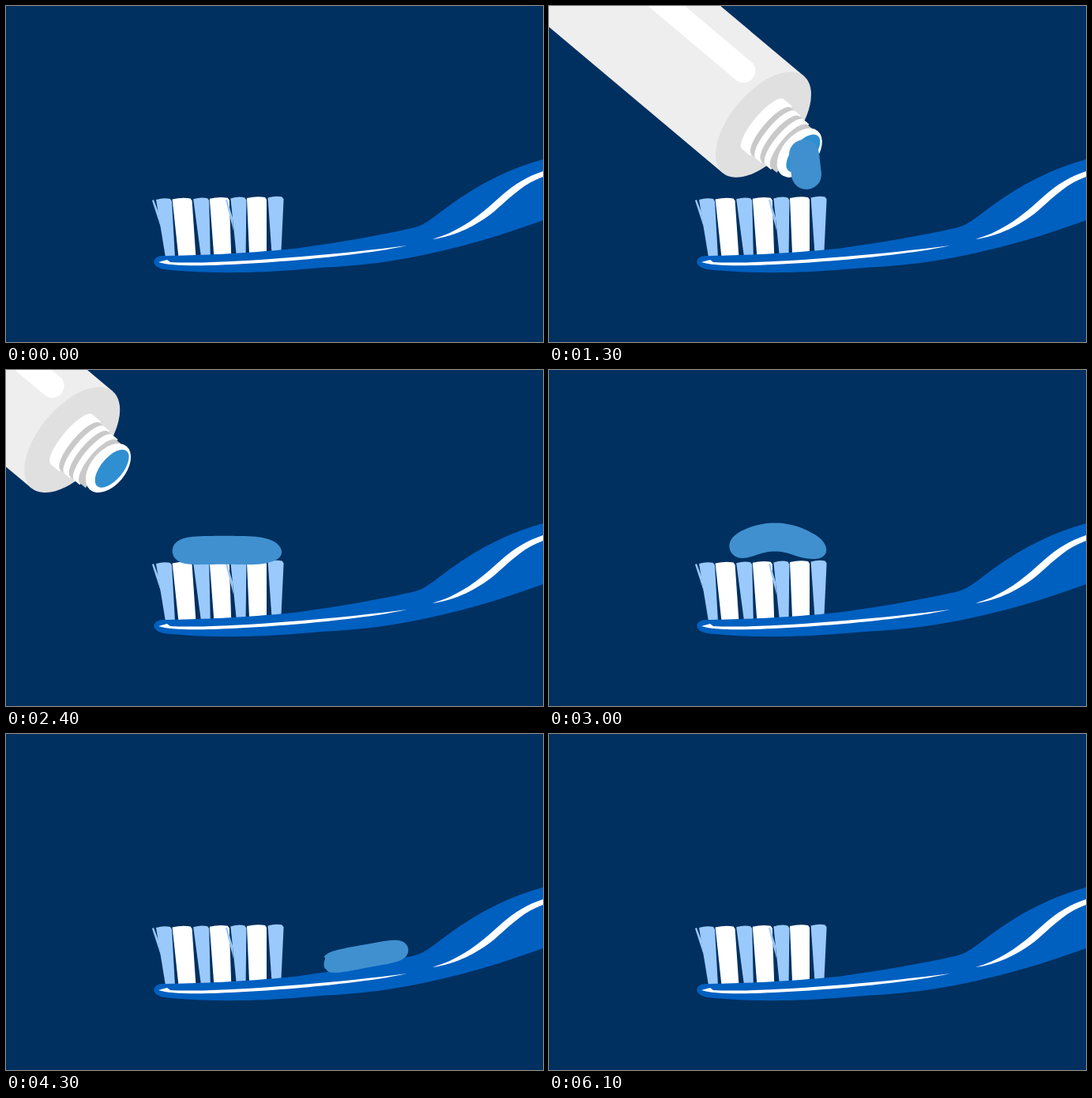
An HTML page that plays this animation: 680 by 425 pixels, repeating every 6.2 s.

```html
<!DOCTYPE html>
<html lang="en">
<head>
<meta charset="utf-8">
<title>Toothpaste on the move</title>
<style>
  html, body { margin: 0; width: 100%; height: 100%; overflow: hidden; background: #003060; }
  svg { display: block; width: 100vw; height: 100vh; }
  .handle { fill: #0060c0; }
  .white { fill: #fff; }
  .pale { fill: #9ac9fb; }
  .thread { fill: #c9c9c9; }
  .body { fill: #eee; }
  .shoulder { fill: #e0e0e0; }
  .shine { stroke: #fff; stroke-width: 30; stroke-linecap: round; }
  .mouth { fill: #308fd0; }
  #body { fill: #4090d0; }
  #drip { stroke: #4090d0; stroke-width: 38; stroke-linecap: round; }
</style>
</head>
<body>
<svg viewBox="0 0 680 425">
  <defs>
    <path id="ground" d="M200 242H325C365 242 355 298 405 301C445 296 480 289 518 280C533 276 545 264 562 252C600 224 640 205 680 194L780 165"/>
  </defs>
  <g id="bristles"></g>
  <path class="pale" d="M185 246L187 245L193 261L196 280ZM278 245H280L287 268L288 284Z"/>
  <path class="handle" d="M198 316C250 316 330 311 372 306C430 298 480 289 518 280C533 276 545 264 562 252C600 224 640 205 680 194V271C620 293 550 314 470 325C440 329 410 330 375 333C310 339 240 338 200 333C183 330 184 317 198 316Z"/>
  <g class="white">
    <path d="M193 324L204 321L208 324C260 327 400 317 508 303C460 314 350 325 260 328C230 329 205 328 193 324Z"/>
    <path d="M540 295C575 285 600 265 625 242C645 224 660 216 680 209V216C655 225 641 240 618 260C597 277 570 291 540 295Z"/>
  </g>
  <g id="tube">
    <g transform="translate(271.5 150) rotate(40)">
      <path class="body" d="M-700 -80H0V80H-700Z"/>
      <path class="shine" d="M-700 -36H-63"/>
      <ellipse class="shoulder" rx="41.5" ry="80"/>
      <g id="neck"></g>
      <ellipse class="white" cx="58" cy="-2" rx="22" ry="36"/>
      <ellipse class="mouth" cx="62" cy="-4.5" rx="14" ry="29"/>
    </g>
  </g>
  <path id="drip"/>
  <path id="body"/>
</svg>
<script>
const LOOP = 6200, STEP = 100;
const el = id => document.getElementById(id);
const ground = el("ground");
const ramp = (t, from, to) => Math.min(1, Math.max(0, (t - from) / (to - from)));
const repeat = (n, make) => Array.from({ length: n }, (_, i) => make(i)).join("");

// Tufts alternate: narrow pale, wide white
el("bristles").innerHTML = repeat(7, i => {
  const wide = i % 2;
  const top = 190 + 23.6 * i - 3 * wide, foot = 202 + 22.4 * i - 6 * wide;
  const w = wide ? 25 : 20, y = 245 - 0.4 * i, base = 318 - 1.1 * i;
  return `<path class="${wide ? "white" : "pale"}" d="M${top} ${y}Q${top + w / 2} ${y - 3} ${top + w - 2} ${y - 1}` +
    `L${top + w} ${y + 2}L${foot + (wide ? 22 : 12)} ${base}H${foot}Z"/>`;
});

// Screw thread: white and grey turns shrinking towards the mouth
el("neck").innerHTML = repeat(6, i => {
  const grey = i % 2, x = 7.5 * i + (grey ? 5.5 : 5) - (i ? 0 : 6);
  const h = 41 - 0.1 * x - grey;
  return `<path class="${grey ? "thread" : "white"}" d="M${x} ${-h}A12 ${h} 0 0 0 ${x} ${h}h${i ? 9 : 14}V${-h}Z"/>`;
});

// Spine follows the ground between two distances, arched by lift
function spine(tail, head, lift, r, s) {
  const d = tail + (head - tail) * s;
  const a = ground.getPointAtLength(d - 1), b = ground.getPointAtLength(d + 1);
  const len = Math.hypot(b.x - a.x, b.y - a.y) || 1;
  const up = 0.7 * r + lift * Math.sin(Math.PI * s);
  return [(a.x + b.x) / 2 + (b.y - a.y) / len * up, (a.y + b.y) / 2 - (b.x - a.x) / len * up];
}

function sausage(tail, head, lift, r) {
  const back = [], belly = [], n = 40;
  for (let i = 0; i <= n; i++) {
    const s = (1 - Math.cos(Math.PI * i / n)) / 2;
    const [x, y] = spine(tail, head, lift, r, s);
    const [x0, y0] = spine(tail, head, lift, r, s - 0.01);
    const [x1, y1] = spine(tail, head, lift, r, s + 0.01);
    const half = r * Math.sqrt(1 - (2 * s - 1) ** 6) / Math.hypot(x1 - x0, y1 - y0);
    const nx = (y1 - y0) * half, ny = (x0 - x1) * half;
    back.push(`${x + nx} ${y + ny}`);
    belly.unshift(`${x - nx} ${y - ny}`);
  }
  return `M${back.concat(belly).join("L")}Z`;
}

// Inchworm gait: head and tail advance in turn, the back arches once a stride
function crawl(t) {
  const p = Math.max(-0.35, (t - 3000) / 550);
  const q = Math.max(0, p);
  const sway = v => 0.16 * Math.sin(2 * Math.PI * v);
  const arch = (0.5 + 0.5 * Math.cos(2 * Math.PI * p)) ** 1.5;
  return sausage(30 + 87.5 * (p - sway(p)), 142 + 79 * (q + sway(q)), (18 + 3 * p) * arch, 18 - 1.4 * q);
}

const start = performance.now();

function draw() {
  const time = (performance.now() - start) % LOOP;
  const t = Math.floor(time / STEP) * STEP;

  const away = 1 - ramp(t, 0, 700) + ramp(t, 2200, 2900);
  const pull = Math.sin(ramp(t, 1300, 2000) * Math.PI / 2);
  const dx = -110 * pull, dy = 4 * pull;
  el("tube").setAttribute("transform", `translate(${dx - 272 * away} ${dy - 230 * away})`);

  const squeezing = t >= 1300 && t < 2300;
  const fall = ramp(t, 1300, 1800);
  const x = 326 + dx + 12 * fall;
  el("drip").setAttribute("d", squeezing ? `M${323 + dx} ${188 + dy}L${x} ${213 + 13 * fall}` : "");

  let shape = "";
  if (t >= 2300) shape = crawl(t);
  else if (t > 1300) shape = sausage(x - 218, 144, 0, 18 * Math.sqrt(fall));
  el("body").setAttribute("d", shape);

  requestAnimationFrame(draw);
}
draw();
</script>
</body>
</html>
```
